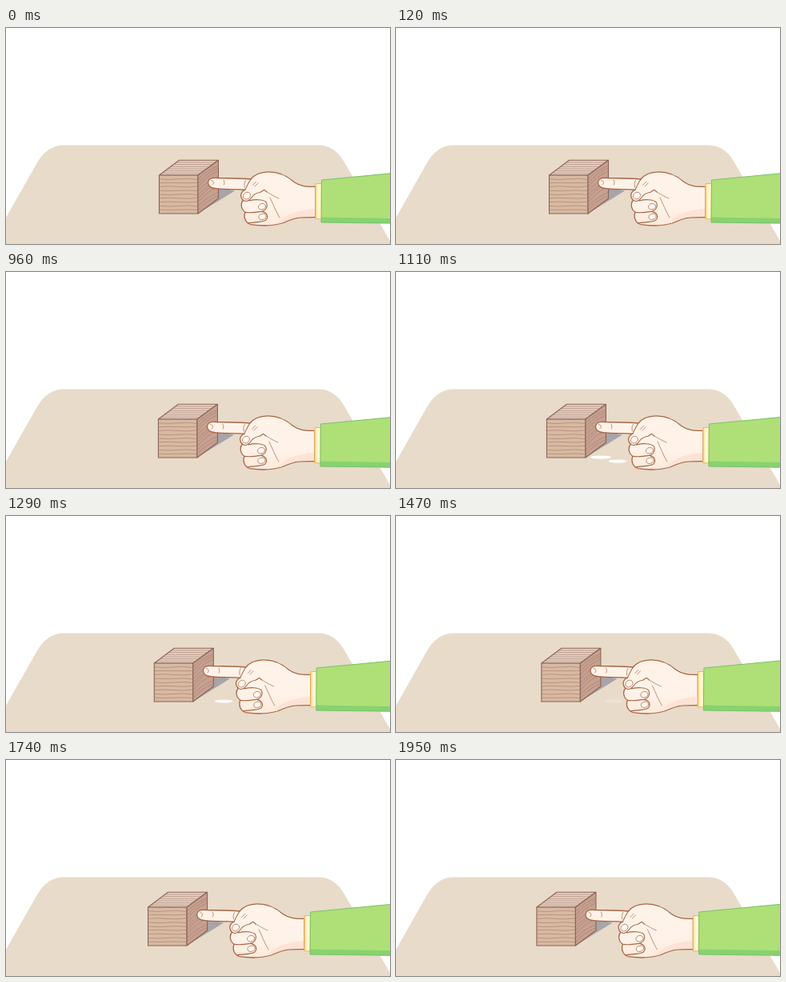
Recreate the animation shown at these times as an HTML page. Size 480 by 270 pixels, loop 3.63 s.

```html
<!DOCTYPE html>
<html lang="en">
<head>
<meta charset="utf-8">
<title>Pushing a wooden block</title>
<style>
html, body { margin: 0; width: 100%; height: 100%; overflow: hidden; background: #fff; }
svg { display: block; width: 100vw; height: 100vh; }
.ink { fill: none; stroke: #a66645; stroke-width: 1.1; stroke-linecap: round; stroke-linejoin: round; }
.thin { stroke-width: .7; }
.skin { fill: url(#skin); stroke: #a66645; stroke-width: 1.3; stroke-linejoin: round; }
.nail { fill: #fff8f3; stroke: #b57958; stroke-width: .8; }
.block { stroke: #8a6356; stroke-width: 1.1; stroke-linejoin: round; }
.grain { fill: none; stroke: #a27c6b; stroke-width: .6; }
</style>
</head>
<body>
<svg viewBox="0 0 480 270">
  <defs>
    <linearGradient id="skin" gradientUnits="userSpaceOnUse" x1="0" y1="180" x2="0" y2="247">
      <stop offset="0" stop-color="#fff2e8"/>
      <stop offset=".6" stop-color="#fff3e9"/>
      <stop offset="1" stop-color="#feeadd"/>
    </linearGradient>
    <linearGradient id="cuff">
      <stop offset="0" stop-color="#ffdf91"/>
      <stop offset=".55" stop-color="#fffbe0"/>
      <stop offset="1" stop-color="#ffe9a8"/>
    </linearGradient>
  </defs>
  <path fill="#e8dbca" d="M0 237 38 170Q51 146.5 72 146.5H390Q411 146.5 423 168L480 266V270H0Z"/>
  <g fill="#fff">
    <ellipse id="streakA" cx="256" cy="231.6" rx="13" ry="2.1"/>
    <ellipse id="streakB" rx="11.5" ry="2.1"/>
  </g>
  <g id="push">
    <path fill="#a8a4a8" d="M240 232 286 203.5 265 199Z"/>
    <path class="block" fill="#e6d0c3" d="M191.5 184 216.5 165.3H265.5L240 184Z"/>
    <path class="block" fill="#d8b9a2" d="M191.5 184H240V232H191.5Z"/>
    <path class="block" fill="#c7a091" d="M240 184 265.5 165.3V213L240 232Z"/>
    <path id="grain" class="grain"/>

    <path class="skin" d="M306 189C291 187.5 275 188 261 187.3C251 187.2 250.5 196 257 199.3C263 202.3 284 201 299 202.2C293 205 292 211 296.5 215.2C293 219 293.5 226.5 299 230.2C296.5 237 299.5 244 306 245.6C318 247.5 333 247.5 345 244C354 240 360 237.2 369 236.8L387 236.5V198.3C376 198.8 368 198.2 360 192.5C352 185 343 179.8 328 179.8C317 180 310 184 306 189Z"/>
    <path fill="#fde3d5" d="M340 244.5C350 232 364 228 386 226V236L369 236.2C360 236.5 353 240 345 243.4Z"/>
    <!-- Thumb, then two curled fingers whose tips meet the palm. -->
    <path class="ink" d="M306 189C302 195 300.5 199 299 202.2M296.5 215.2C299 217.5 304 216.5 306.5 212.5C309 208.5 313 206 318 205.3L323 202.3L326 205M304 216C311 214 321 214 325 217.5C328 222 325.5 228 319.5 229.4C312 230.5 305 231.5 299 230.2M320 229.4C326.5 231 328.5 236 325 240C320 243 311 242.5 303 243.8"/>
    <path class="ink thin" d="M299.5 190.5C297.8 193 297.7 196 298.5 199M272 190C273.3 192 273.3 194 272.4 196M308.5 196.5 312.5 192.3M311 198 315.2 193.8M256.5 190.5C260 190.8 260.5 194.5 258 196M326 205C330 207 334 210 341 213M330 212C334 220 337 229 342 237"/>
    <ellipse class="nail" cx="301" cy="209.6" rx="4.8" ry="4" transform="rotate(-38 301 209.6)"/>
    <ellipse class="nail" cx="320" cy="223.2" rx="4.6" ry="3.7" transform="rotate(-15 320 223.2)"/>
    <ellipse class="nail" cx="320.5" cy="235.8" rx="4.6" ry="3.5" transform="rotate(-15 320.5 235.8)"/>

    <path fill="url(#cuff)" stroke="#f1b55b" d="M387 194.5H394.5V238.8H387Z"/>
    <path fill="#aee077" d="M394.5 190 510 179V244.5L394 243Z"/>
    <path fill="#88d270" d="M394.1 236.6 510 238.4V244.5L394 243Z"/>
    <path fill="none" stroke="#78c166" d="M510 179 394.5 190 394 243 510 244.5"/>
  </g>
</svg>
<script>
const el = id => document.getElementById(id);
const clamp = v => Math.max(0, Math.min(1, v));
const span = (t, a, b) => clamp((t - a) / (b - a));

let grain = "";
for (let i = 1; i < 7; i++) {
  const k = i / 7;
  grain += `M${191.5 + 25 * k} ${184 - 18.7 * k}h48.7`;
}
for (let i = 1; i < 10; i++) {
  const y = 184 + i * 4.8, bend = Math.sin(i * 1.7) * 1.5;
  grain += `M192 ${y}q12 ${bend} 24 0t24 ${bend / 2}`;
  // Side grain follows the receding edge with a slight bulge.
  grain += `M240.5 ${y}q10 ${-12 + bend} 24.5 ${-18 + bend}`;
}
el("grain").setAttribute("d", grain);

function draw(now) {
  const t = now % 3630;
  const p = span(t, 870, 1880);
  const eased = p - .25 * Math.sin(2 * Math.PI * p) / (2 * Math.PI);
  el("push").setAttribute("transform", `translate(${-15.6 * eased} 0)`);

  const appear = span(t, 960, 1050);
  el("streakA").setAttribute("opacity", appear * (1 - span(t, 1170, 1270)));
  const drift = span(t, 1110, 1290);
  const b = el("streakB");
  b.setAttribute("cx", 277 - 5 * drift);
  b.setAttribute("cy", 236.6 - 5 * drift);
  b.setAttribute("opacity", appear * (1 - span(t, 1260, 1530)));
  requestAnimationFrame(draw);
}
draw(0);
</script>
</body>
</html>
```
